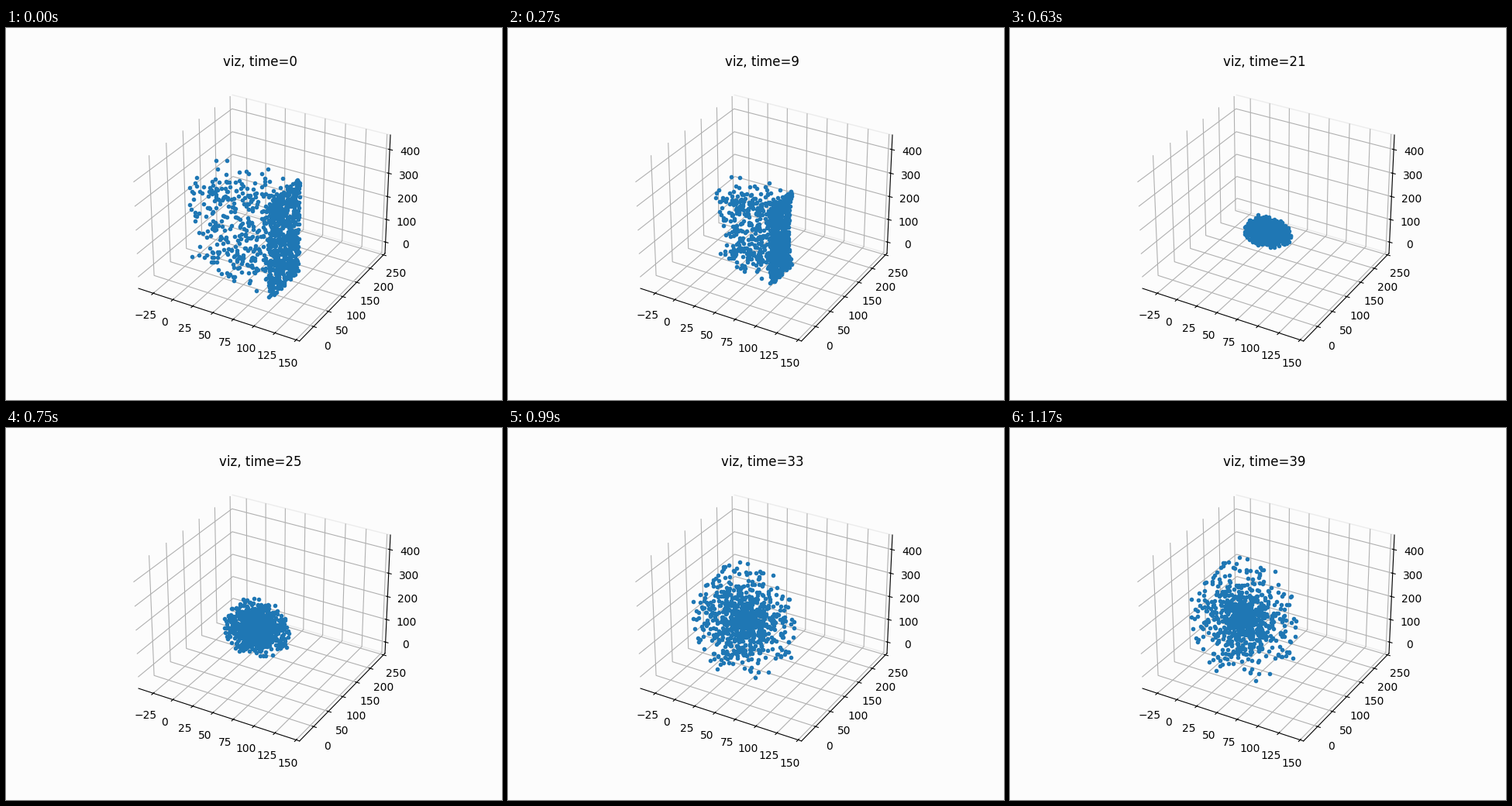
These frames come from a looping animation (640 px wide and 480 px high, 1200 ms). A matplotlib script:

```python
import numpy as np
import matplotlib.pyplot as plt
from matplotlib.animation import FuncAnimation

FRAMES, STEP_MS = 40, 30
BACK = "#fcfcfc"
BOX = np.array([100, 100, 400])
CENTRE = np.array([79, 50, 200])
DRIFT = np.array([-32, 0, 26])
SLAB, LOOSE = 560, 400
N = SLAB + LOOSE

rng = np.random.default_rng(7)

# A loose box of particles with a dense sheet on its x = 100 side
start = rng.uniform(0, 1, (N, 3)) * BOX
start[:SLAB, 0] = 100
offset = start - CENTRE

# The ends of the column fall inwards more slowly than its middle
ends = np.abs(offset[:, 2] / CENTRE[2]) ** 4
side_rate = 0.099 - 0.017 * ends
rate = np.column_stack([side_rate, side_rate, np.full(N, 0.0713)])

# Direction and rank from the middle of each particle after the collapse
way = rng.normal(size=(N, 3))
way /= np.linalg.norm(way, axis=1, keepdims=True)
rank = rng.uniform(0, 1, (N, 1))
stray = 1 + 0.3 * (rng.uniform(size=(N, 1)) < 0.015)


def smooth(v):
    v = np.clip(v, 0, 1)
    return v * v * (3 - 2 * v)


def collapse(t):
    return CENTRE + offset * np.cos(rate * t)


def cloud(t):
    """Expanding ball that grows a denser core as it drifts away."""
    s = max(0, (t - 17) / 22)
    grow = smooth(1.15 * s)
    width, height = 24 + 45 * grow, 25 + 235 * grow
    radius = stray * rank ** (0.8 + 0.8 * s)
    return CENTRE + DRIFT * grow + way * radius * [width, width, height]


def positions(t):
    w = smooth((t - 15) / 5)
    return collapse(t) * (1 - w) + cloud(t) * w


def padded(low, high):
    pad = (high - low) / 48
    return low - pad, high + pad


fig = plt.figure(figsize=(6.4, 4.8), dpi=100, facecolor=BACK)
ax = fig.add_subplot(111, projection="3d", facecolor=BACK)
dots, = ax.plot(*start.T, linestyle="", marker=".", color="#1f77b4")
title = ax.set_title("viz, time=0")

ax.set_xticks(range(-25, 151, 25))
ax.set_yticks(range(0, 251, 50))
ax.set_zticks(range(0, 401, 100))
ax.set_xlim(*padded(-40, 150))
ax.set_ylim(*padded(-40, 250))
ax.set_zlim(*padded(-40, 450))

# Only the back wall shows a faint outline
ax.xaxis.pane.set_visible(False)
ax.zaxis.pane.set_visible(False)
ax.yaxis.pane.set(facecolor=BACK, edgecolor="#ececec", alpha=1)


def update(i):
    dots.set_data_3d(*positions(i).T)
    title.set_text(f"viz, time={i}")
    return dots, title


anim = FuncAnimation(fig, update, frames=FRAMES, interval=STEP_MS,
                     repeat=True, repeat_delay=0, blit=False)
plt.show()
```
